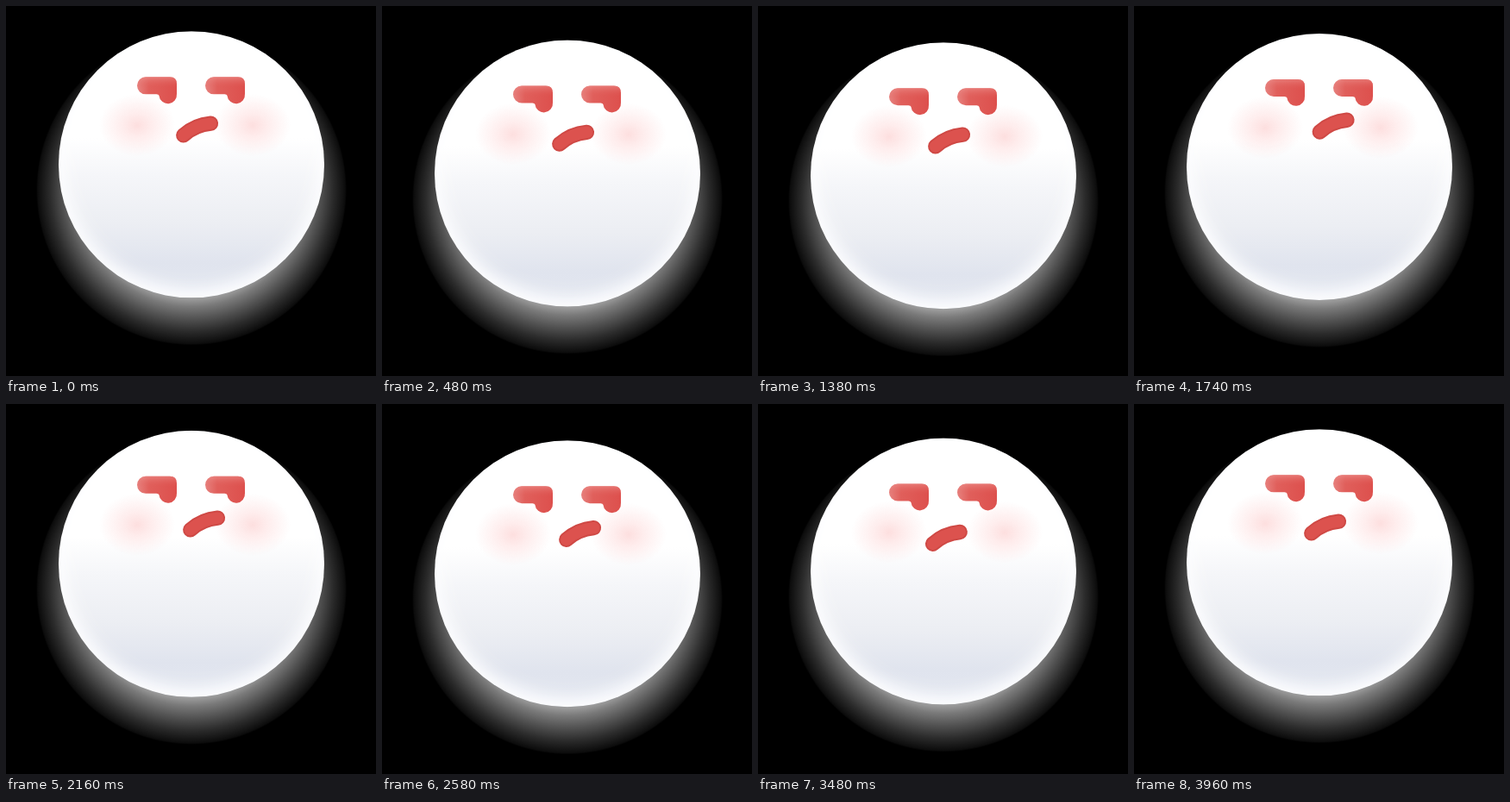
Recreate the animation shown at these times as an HTML page. Size 429 by 429 pixels, loop 4.02 s.

```html
<!DOCTYPE html>
<html lang="en">
<head>
<meta charset="utf-8">
<title>Grumpy ball</title>
<style>
  html, body { margin: 0; width: 100%; height: 100%; overflow: hidden; background: #000; }
  #ball { position: absolute; left: 0; top: 0; width: 429px; height: 429px; }
  .glow {
    position: absolute; left: 35px; top: 33px; width: 360px; height: 360px;
    background: radial-gradient(circle closest-side, #ffffff9c 70%, #ffffff7a 75%, #ffffff52 83%, #ffffff2c 91%, #ffffff0c 99%, #fff0);
  }
  .skin {
    position: absolute; left: 60.7px; top: 29.3px; width: 308.6px; height: 308.6px;
    border-radius: 50%;
    background:
      radial-gradient(44px 36px at 91px 109px, #fddfdf, #fee8e8cc 38%, #fff0f000),
      radial-gradient(44px 36px at 225px 109px, #fddfdf, #fee8e8cc 38%, #fff0f000),
      linear-gradient(#fff 40%, #f5f6f9 54%, #eceef3 72%, #e0e4ee 87%, #e4e8f1);
    box-shadow: inset 0 0 32px #fff, inset 0 -6px 18px #fafbfe;
  }
  svg { position: absolute; left: 0; top: 0; }
</style>
</head>
<body>
<div id="ball">
  <div class="glow"></div>
  <div class="skin"></div>
  <svg width="429" height="429" viewBox="0 0 429 429">
    <defs>
      <linearGradient id="red">
        <stop offset="0" stop-color="#e7827f"/>
        <stop offset=".3" stop-color="#e05f5b"/>
        <stop offset="1" stop-color="#dd504d"/>
      </linearGradient>
      <linearGradient id="sheen" x2="0" y2="1">
        <stop offset="0" stop-color="#f09a96" stop-opacity=".5"/>
        <stop offset=".4" stop-color="#e05c58" stop-opacity="0"/>
      </linearGradient>
      <path id="lid" d="M162 82H190Q198 82 198 90V101.5A10.3 10.3 0 0 1 177.4 103.5Q177 102 174.5 102H162A10 10 0 0 1 162 82Z"/>
      <g id="eye">
        <use href="#lid" fill="url(#red)"/>
        <use href="#lid" fill="url(#sheen)"/>
      </g>
      <path id="lip" d="M205.8 149.5Q219 137.5 237.4 135.8" fill="none" stroke-linecap="round"/>
    </defs>
    <use href="#eye"/>
    <use href="#eye" x="79"/>
    <g id="mouth">
      <use href="#lip" stroke="#cf4945" stroke-width="17.4"/>
      <use href="#lip" stroke="#dc524e" stroke-width="13.5"/>
    </g>
  </svg>
</div>
<script>
  const LOOP = 4020, STEP = 60, BOB = LOOP / 2;
  const ball = document.getElementById('ball');
  const mouth = document.getElementById('mouth');
  // [time, shift]: the mouth slides up to the right and springs back
  const slide = [[0, 0], [1380, 0], [1800, 1.25], [2160, 1], [3060, 1], [3480, -.4], [3900, 0], [LOOP, 0]];

  function shiftAt(t) {
    const i = slide.findIndex(key => key[0] > t);
    const [t0, a] = slide[i - 1], [t1, b] = slide[i];
    return a + (b - a) * (1 - Math.cos(Math.PI * (t - t0) / (t1 - t0))) / 2;
  }

  const start = performance.now();
  function draw() {
    const elapsed = Math.max(0, performance.now() - start) % LOOP;
    const t = Math.floor(elapsed / STEP) * STEP;
    const y = .3 + 10 * (1 - Math.cos(2 * Math.PI * (t + 30) / BOB));
    const s = shiftAt(t);
    ball.style.transform = `translateY(${y.toFixed(2)}px)`;
    mouth.setAttribute('transform', `translate(${8 * s} ${-5.5 * s})`);
    requestAnimationFrame(draw);
  }
  draw();
</script>
</body>
</html>
```
